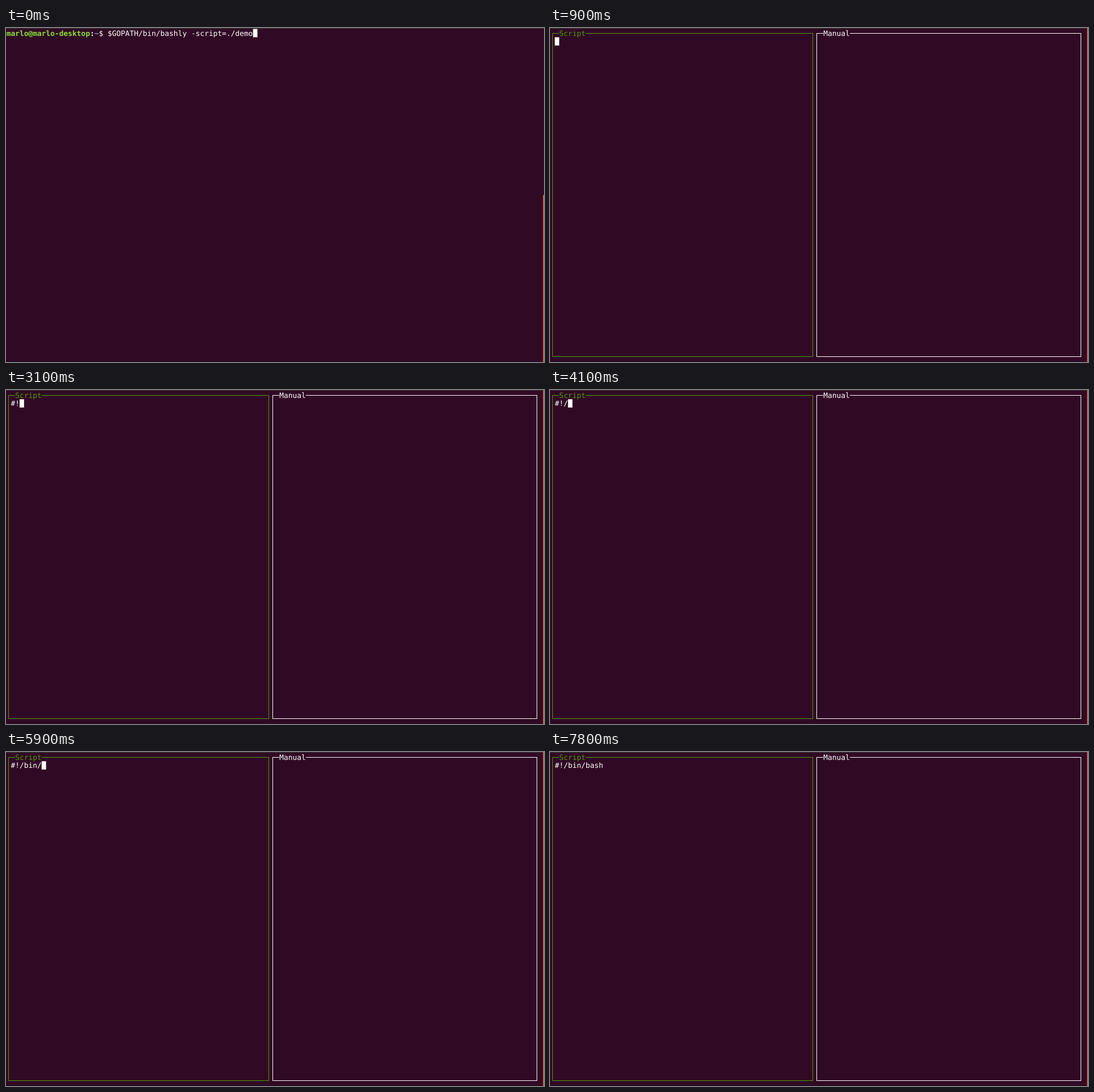
Write an HTML page that moves like this. It is 949 by 590 pixels and loops after 8000 ms.

```html
<!DOCTYPE html>
<html lang="en">
<head>
<meta charset="utf-8">
<title>Terminal</title>
<style>
  html, body { margin: 0; width: 100%; height: 100%; overflow: hidden; background: #300a24; }
  svg { display: block; width: 949px; height: 590px; }
  text {
    font: 12.9px "DejaVu Sans Mono", monospace;
    fill: #fff;
    white-space: pre;
    text-rendering: geometricPrecision;
  }
  .user { fill: #8ae234; font-weight: bold; }
  .path { fill: #729fcf; font-weight: bold; }
  .bold { font-weight: bold; }
  .line { fill: none; stroke: #fff; shape-rendering: crispEdges; }
  .active { stroke: #4e9a06; }
  text.active { fill: #4e9a06; stroke: none; }
</style>
</head>
<body>
<svg viewBox="0 0 949 590">
  <rect width="949" height="590" fill="#300a24"/>
  <rect width="949" height="1" fill="#3c3b37"/>
  <rect y="589" width="949" height="1" fill="#210819"/>
  <g id="bar">
    <rect x="947" width="1" height="590" fill="#8f4238"/>
    <rect x="948" width="1" height="590" fill="#ea7452"/>
  </g>
  <g id="shell">
    <text x="0.7" y="13.6"><tspan class="user">marlo@marlo-desktop</tspan><tspan class="bold">:</tspan><tspan class="path">~</tspan>$ $GOPATH/bin/bashly -script=./demo</text>
  </g>
  <g id="editor">
    <path class="line active" d="M16 9.5H4.5V580.5H463.5V9.5H63"/>
    <text class="active" x="16.2" y="13.6">Script</text>
    <path class="line" d="M482 9.5H470.5V580.5H936.5V9.5H529"/>
    <text x="482.3" y="13.6">Manual</text>
    <text id="code" x="8.5" y="28.2"></text>
  </g>
  <rect id="cursor" width="7.8" height="14.6" fill="#fff"/>
</svg>
<script>
const LOOP = 8000, CELL_W = 7.768, ROW_H = 14.64, OPEN = 900;
const CODE = "#!/bin/bash", PROMPT_COLS = 56;

// [time, typed characters, cursor visible]
const STEPS = [
  [0, 0, 1], [500, 0, 0], [OPEN, 0, 1], [1500, 0, 0], [2000, 0, 1],
  [2500, 1, 1], [3100, 2, 1], [3600, 2, 0], [4100, 3, 1], [4700, 3, 0],
  [4900, 4, 1], [5100, 5, 1], [5300, 6, 1], [5900, 7, 1], [6400, 7, 0],
  [6600, 8, 1], [6800, 9, 1], [7000, 10, 1], [7200, 11, 1], [7800, 11, 0]
];

const el = id => document.getElementById(id);
const show = (id, on) => el(id).setAttribute("visibility", on ? "visible" : "hidden");
let last = null;

function draw(t) {
  const step = STEPS.findLast(s => s[0] <= t);
  if (step === last) return;
  last = step;
  const [, typed, visible] = step;
  const open = t >= OPEN;
  show("shell", !open);
  show("editor", open);
  show("cursor", visible);
  el("bar").setAttribute("transform", `translate(0 ${open ? 0 : 295})`);
  el("code").textContent = CODE.slice(0, typed);
  const col = open ? typed + 1 : PROMPT_COLS;
  el("cursor").setAttribute("x", 0.7 + col * CELL_W);
  el("cursor").setAttribute("y", 1.7 + (open ? ROW_H : 0));
}

function tick() {
  draw(performance.now() % LOOP);
  requestAnimationFrame(tick);
}
tick();
</script>
</body>
</html>
```
